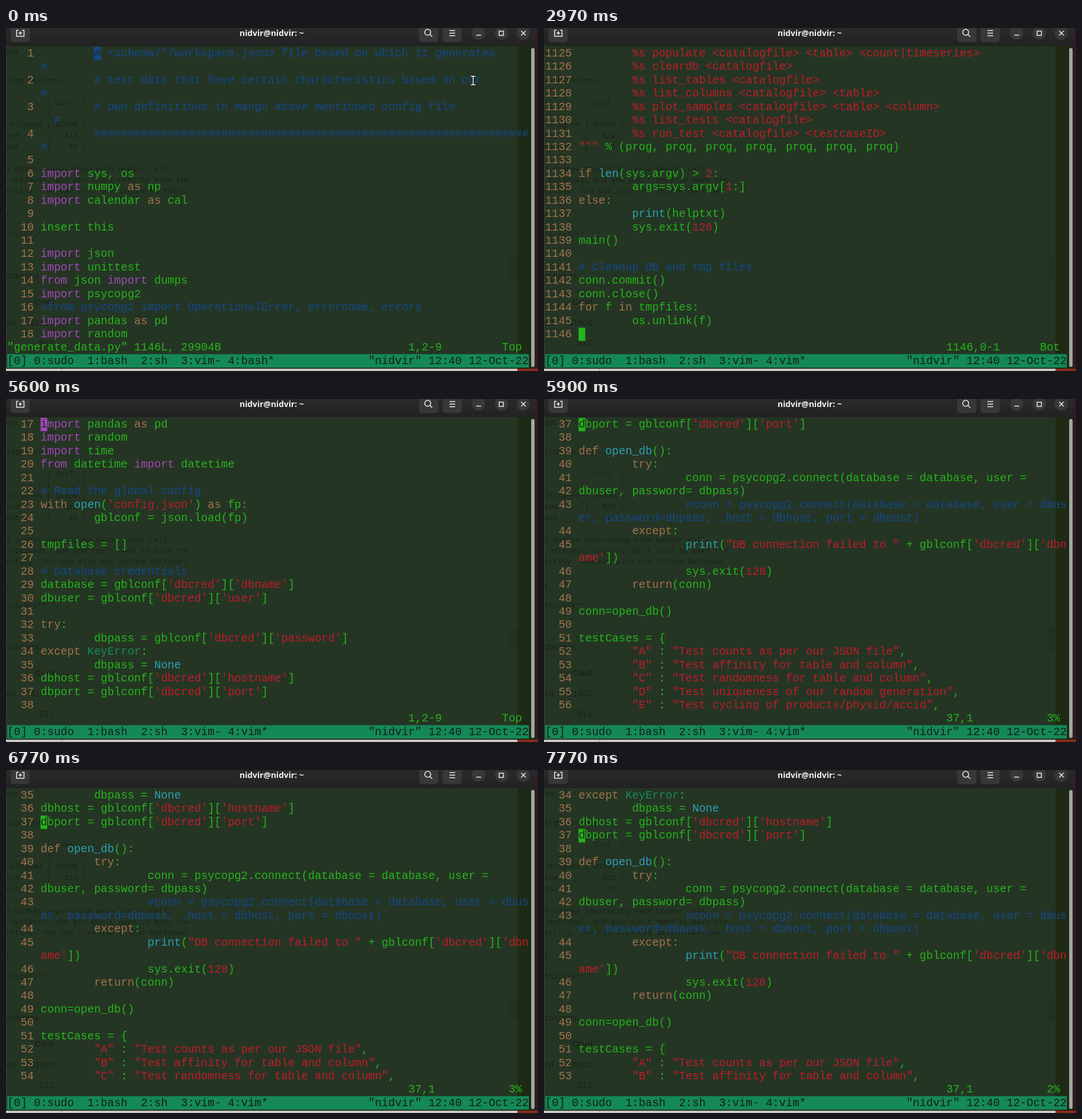
An HTML page with a canvas for the animation above (8000 ms loop, 931 by 601 pixels).

```html
<!DOCTYPE html>
<html lang="en">
<head>
<meta charset="utf-8">
<title>Terminal</title>
<style>
html, body { margin: 0; width: 100%; height: 100%; overflow: hidden; background: #253524; }
canvas { display: block; width: 931px; height: 601px; }
</style>
</head>
<body>
<canvas id="stage" width="931" height="601"></canvas>
<script>
const ctx = document.getElementById('stage').getContext('2d');
const LOOP = 8000, X0 = 2, Y0 = 33, CW = 11.702, RH = 23.43;
const ROWS = 22, GUTTER = 5, WRAP = 73;
const MONO = '"Liberation Mono", monospace', SANS = '"Liberation Sans", sans-serif';
const USER = 'nidvir';
const C = {
  bg: '#253524', text: '#24b51b', number: '#a2734c', keyword: '#a2734c', include: '#a347ba',
  string: '#c01c28', name: '#2aa1b3', comment: '#12488b', error: '#188a57',
  bar: '#148957', barText: '#141c1b', ghost: '#182519'
};

const tab = '\t';
const source = {};
function addLines(first, lines) {
  lines.forEach((line, i) => { source[first + i] = line.replace(/\t/g, ' '.repeat(8)); });
}
const boxed = (text, col) => (' '.repeat(8) + text).padEnd(col) + '#';

addLines(1, [
  boxed('# <schema/*/workspace.json> file based on which it generates', 73),
  boxed('# test data that have certain characteristics based on our', 73),
  boxed('# own definitions in mango above mentioned config file', 75),
  tab + '#'.repeat(66),
  '',
  'import sys, os',
  'import numpy as np',
  'import calendar as cal',
  '',
  'insert this',
  '',
  'import json',
  'import unittest',
  'from json import dumps',
  'import psycopg2',
  '#from psycopg2 import OperationalError, errorcode, errors',
  'import pandas as pd',
  'import random',
  'import time',
  'from datetime import datetime',
  '',
  '# Read the global config',
  "with open('config.json') as fp:",
  tab + 'gblconf = json.load(fp)',
  '',
  'tmpfiles = []',
  '',
  '# Database credentials',
  "database = gblconf['dbcred']['dbname']",
  "dbuser = gblconf['dbcred']['user']",
  '',
  'try:',
  tab + "dbpass = gblconf['dbcred']['password']",
  'except KeyError:',
  tab + 'dbpass = None',
  "dbhost = gblconf['dbcred']['hostname']",
  "dbport = gblconf['dbcred']['port']",
  '',
  'def open_db():',
  tab + 'try:',
  tab + tab + 'conn = psycopg2.connect(database = database, user =',
  'dbuser, password= dbpass)',
  tab + tab + '#conn = psycopg2.connect(database = database, user = dbuser, password=dbpass, _host = dbhost, port = dbpost)',
  tab + 'except:',
  tab + tab + `print("DB connection failed to " + gblconf['dbcred']['dbname'])`,
  tab + tab + 'sys.exit(128)',
  tab + 'return(conn)',
  '',
  'conn=open_db()',
  '',
  'testCases = {',
  tab + '"A" : "Test counts as per our JSON file",',
  tab + '"B" : "Test affinity for table and column",',
  tab + '"C" : "Test randomness for table and column",',
  tab + '"D" : "Test uniqueness of our random generation",',
  tab + '"E" : "Test cycling of products/physid/accid",'
]);

addLines(1125, [
  tab + '%s populate <catalogfile> <table> <count|timeseries>',
  tab + '%s cleardb <catalogfile>',
  tab + '%s list_tables <catalogfile>',
  tab + '%s list_columns <catalogfile> <table>',
  tab + '%s plot_samples <catalogfile> <table> <column>',
  tab + '%s list_tests <catalogfile>',
  tab + '%s run_test <catalogfile> <testcaseID>',
  '""" % (prog, prog, prog, prog, prog, prog, prog)',
  '',
  'if len(sys.argv) > 2:',
  tab + 'args=sys.argv[1:]',
  'else:',
  tab + 'print(helptxt)',
  tab + 'sys.exit(128)',
  'main()',
  '',
  '# Cleanup DB and tmp files',
  'conn.commit()',
  'conn.close()',
  'for f in tmpfiles:',
  tab + 'os.unlink(f)',
  ''
]);

const rules = new RegExp([
  '(?<comment>#.*)',
  '(?<string>^ +%s.*|"""|"[^"]*"|\'[^\']*\'|\\b\\d+\\b)',
  '(?<include>\\b(?:import|from)\\b)',
  '(?<keyword>\\b(?:as|if|else|def|try|except|return|for|in|with)\\b)',
  '(?<name>(?<=def )\\w+|\\b(?:len|print|open|None)\\b)',
  '(?<error>\\bKeyError\\b)'
].join('|'), 'g');

// One colour per character
function colours(line) {
  const out = Array(line.length).fill(C.text);
  for (const m of line.matchAll(rules)) {
    const kind = Object.keys(m.groups).find(k => m.groups[k] !== undefined);
    out.fill(C[kind], m.index, m.index + m[0].length);
  }
  return out;
}

// start, top line, cursor line (0 = hidden), position, scroll label
const timeline = [
  [0, 1, 1, '1,2-9', 'Top'],
  [630, 1, 0, '1,2-9', 'Top'],
  [1700, 1, 1, '1,2-9', 'Top'],
  [1770, 1125, 1146, '1146,0-1', 'Bot'],
  [2370, 1125, 0, '1146,0-1', 'Bot'],
  [2970, 1125, 1146, '1146,0-1', 'Bot'],
  [3270, 1, 1, '1,2-9', 'Top'],
  [3800, 1, 0, '1,2-9', 'Top'],
  [4430, 1, 1, '1,2-9', 'Top'],
  [5070, 1, 0, '1,2-9', 'Top'],
  [5600, 17, 17, '1,2-9', 'Top'],
  [5700, 17, 17, '17,1', ' 1%'],
  [5900, 37, 37, '37,1', ' 3%'],
  [6570, 36, 37, '37,1', ' 3%'],
  [6770, 35, 37, '37,1', ' 3%'],
  [6930, 34, 37, '37,1', ' 2%'],
  [7030, 33, 37, '37,1', ' 2%'],
  [7670, 33, 0, '37,1', ' 2%'],
  [7770, 34, 37, '37,1', ' 2%']
];
const MESSAGE_END = 1770, RENAME = 1870;

function rect(x, y, w, h, fill) {
  ctx.fillStyle = fill;
  ctx.fillRect(x, y, w, h);
}
function label(text, x, y, font, fill) {
  ctx.font = font;
  ctx.fillStyle = fill;
  ctx.fillText(text, x, y);
}
function put(text, col, row, fill) {
  label(text, X0 + col * CW, Y0 + row * RH + 17, '19.5px ' + MONO, fill);
}
function pill(x, y, w, h, r) {
  ctx.fillStyle = '#383838';
  ctx.beginPath();
  ctx.roundRect(x, y, w, h, r);
  ctx.fill();
}
function stroke(...paths) {
  ctx.beginPath();
  for (const [x, y, ...rest] of paths) {
    ctx.moveTo(x, y);
    for (let i = 0; i < rest.length; i += 2) ctx.lineTo(rest[i], rest[i + 1]);
  }
  ctx.stroke();
}

function drawHeader() {
  const shade = ctx.createLinearGradient(0, 0, 0, 32);
  shade.addColorStop(0, '#2a2a2a');
  shade.addColorStop(1, '#222222');
  rect(0, 0, 929, 32, shade);
  for (const x of [8, 723, 764]) pill(x, -10, 33.5, 34.5, 5);
  for (const x of [827, 867, 905]) pill(x - 11.5, -2.5, 23, 23, 11.5);
  ctx.textAlign = 'center';
  label(`${USER}@${USER}: ~`, 465, 14, 'bold 14.3px "Open Sans", sans-serif', '#f4f4f4');
  ctx.textAlign = 'left';

  ctx.strokeStyle = '#eeeeee';
  ctx.lineWidth = 1.5;
  stroke([22, 4, 18.5, 4, 18.5, 14.5, 31.5, 14.5, 31.5, 4, 28, 4],
    [25, 5.5, 25, 12], [21.8, 8.8, 28.2, 8.8]);
  stroke([776, 4.5, 786, 4.5], [776, 9, 786, 9], [776, 13.5, 786, 13.5]);
  stroke([823, 12.5, 831.5, 12.5]);
  stroke([901.5, 5, 909.5, 13], [909.5, 5, 901.5, 13]);
  ctx.strokeRect(863, 5.5, 7.5, 7.5);
  ctx.beginPath();
  ctx.arc(738, 7.5, 5.2, 0, Math.PI * 2);
  ctx.stroke();
  stroke([741.8, 11.3, 746, 15.5]);
}

// The page that shines through the window
function drawGhost() {
  const code = [
    ['lign columns.', 92], ['         | Cool  |', 131], ['--------:| -----:|', 150],
    ['-aligned | $1600 |', 169], ['red      |   $12 |', 189], ['eat      |    $1 |', 208],
    ['3 dashes separating each header cell.', 247],
    [' optional, and you don\'t need to make the', 266],
    ['ettily. You can also use inline Markdown.', 285], ['*nicely**', 362]
  ];
  for (const [text, y] of code) label(text, 0, y + 4, '13.1px ' + MONO, C.ghost);
  const prose = [['ion.', 0, 41], ['y', -2, 325], ['columns.', 0, 434],
    ['ed', 0, 516], ['$1600', 42, 516], ['l', -1, 552], ['$12', 58, 552]];
  for (const [text, x, y] of prose) label(text, x, y + 5, '15.5px ' + SANS, C.ghost);
  label('Cool', 50, 485, 'bold 15.5px ' + SANS, C.ghost);
}

function drawWindow() {
  rect(0, 0, 931, 601, '#3c1128');
  rect(0, 597, 895, 4, '#c9c9c5');
  rect(97, 597, 1, 4, '#8f8f8c');
  rect(895, 597, 36, 4, '#8c2c1c');
  rect(0, 32, 928, 565, C.bg);
  rect(895, 32, 33, 565, '#1f2a15');
  rect(882, 400, 13, 40, '#223120');
  drawGhost();
  rect(0, 32, 1, 565, '#3a4638');
  rect(915, 32, 13, 565, '#1f2817');
  ctx.fillStyle = '#a3a7a1';
  ctx.beginPath();
  ctx.roundRect(919, 35, 6, 559, 3);
  ctx.fill();
  drawHeader();
}

function drawCode(top, cursor) {
  const cursorAt = cursor === 1 ? 8 : 0;
  for (let n = top, row = 0; row < ROWS && n in source; n++) {
    const line = source[n], tint = colours(line);
    put(String(n).padStart(4), 0, row, C.number);
    for (let from = 0; from === 0 || from < line.length; from += WRAP, row++) {
      if (row >= ROWS) return;
      const end = Math.min(from + WRAP, line.length);
      for (let i = from, j; i < end; i = j) {
        for (j = i + 1; j < end && tint[j] === tint[i];) j++;
        put(line.slice(i, j), GUTTER + i - from, row, tint[i]);
      }
      if (n === cursor && from === 0) {
        const col = GUTTER + cursorAt;
        rect(X0 + col * CW, Y0 + row * RH, CW, RH, tint[cursorAt] || C.text);
        put(line[cursorAt] || ' ', col, row, '#1b2a1f');
      }
    }
  }
}

function drawPointer() {
  for (const [width, colour] of [[3.4, '#1a1f1a'], [1.4, '#ffffff']]) {
    ctx.lineWidth = width;
    ctx.strokeStyle = colour;
    stroke([813.5, 84.5, 816.5, 84.5, 817.5, 86, 817.5, 98, 816.5, 99.5, 813.5, 99.5],
      [821.5, 84.5, 818.5, 84.5, 817.5, 86], [821.5, 99.5, 818.5, 99.5, 817.5, 98]);
  }
}

function draw(t) {
  const [, top, cursor, position, scroll] = timeline.findLast(s => s[0] <= t);
  drawWindow();
  drawCode(top, cursor);
  if (t < MESSAGE_END) put('"generate_data.py" 1146L, 29904B', 0, 22, C.text);
  put(position, 60, 22, C.text);
  put(scroll, 74, 22, C.text);
  rect(X0, 571.5, 913, 23.5, C.bar);
  put('[0] 0:sudo  1:bash  2:sh  3:vim- 4:' + (t < RENAME ? 'bash*' : 'vim*'), 0, 23, C.barText);
  put(`"${USER}" 12:40 12-Oct-22`, 54, 23, C.barText);
  if (t < MESSAGE_END) drawPointer();
}

const start = performance.now();
function tick() {
  draw((performance.now() - start) % LOOP);
  requestAnimationFrame(tick);
}
tick();
</script>
</body>
</html>
```
